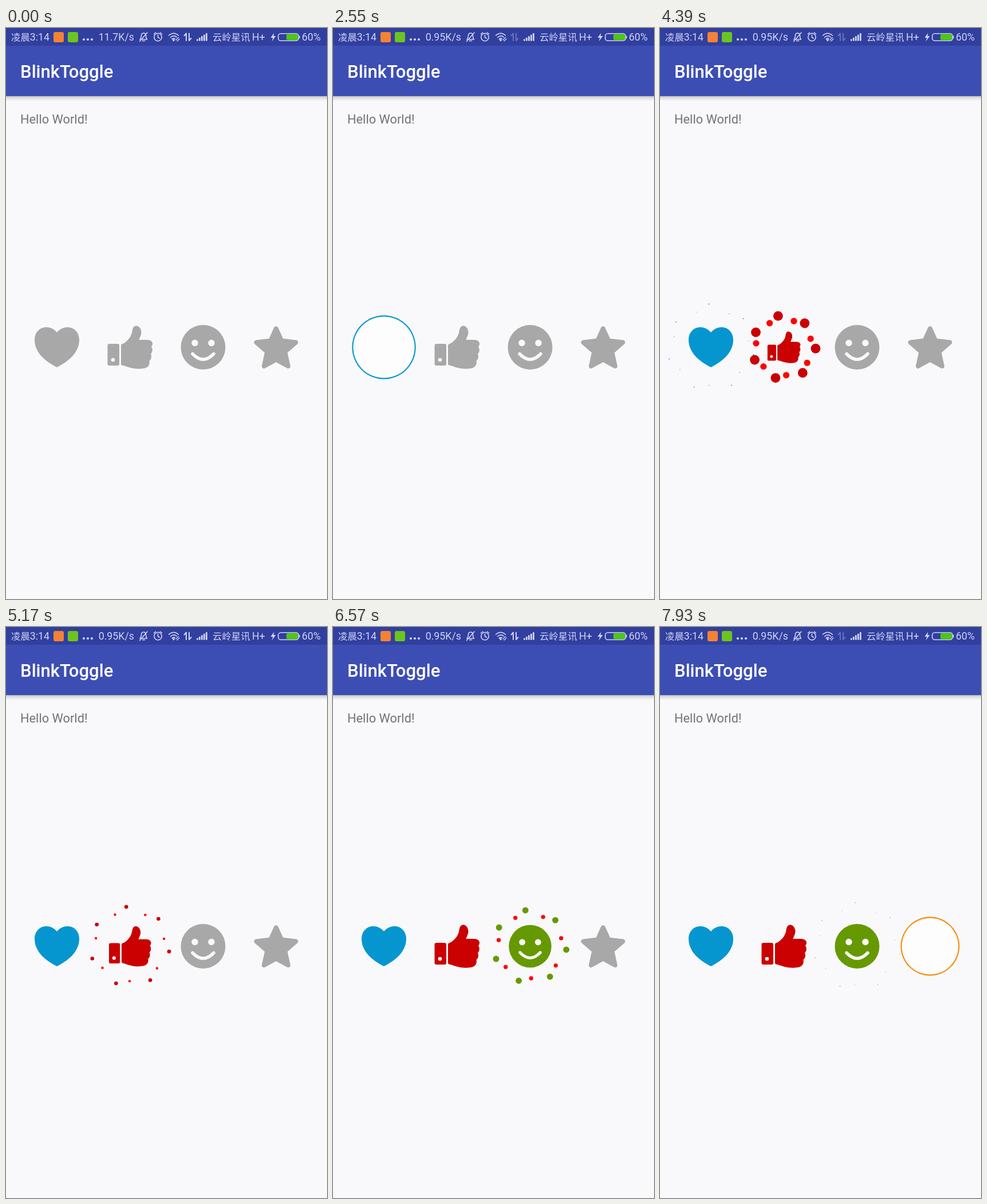
Recreate the animation shown at these times as an HTML page. Size 561 by 998 pixels, loop 8000 ms.

```html
<!DOCTYPE html>
<html lang="en">
<head>
<meta charset="utf-8">
<title>Button sparkle</title>
<style>
  html, body { margin: 0; width: 100%; height: 100%; overflow: hidden; background: #f9f9fb; }
  svg { display: block; width: 100%; height: 100%; }
  text { font-family: Roboto, "Noto Sans CJK SC", "Noto Sans CJK", sans-serif; }
  .status { font-size: 17.8px; fill: #d0d4f2; }
  .cjk { font-size: 16.4px; }
  .line { fill: none; stroke: #d0d4f2; stroke-width: 1.6; stroke-linecap: round; stroke-linejoin: round; }
  .solid { fill: #d0d4f2; }
</style>
</head>
<body>
<svg id="stage" viewBox="0 0 561 998">
  <defs>
    <linearGradient id="shade" x2="0" y2="1">
      <stop offset="0" stop-color="#000" stop-opacity=".3"/>
      <stop offset=".4" stop-color="#000" stop-opacity=".11"/>
      <stop offset="1" stop-color="#000" stop-opacity="0"/>
    </linearGradient>
  </defs>
  <rect width="561" height="998" fill="#f9f9fb"/>
  <rect y="118" width="561" height="10" fill="url(#shade)"/>
  <rect width="561" height="119" fill="#3c4eb4"/>
  <rect width="561" height="31" fill="#313f9f"/>

  <text class="status" x="9" y="22"><tspan class="cjk">凌晨</tspan>3:14</text>
  <rect x="83" y="7" width="18" height="18" rx="3" fill="#f58232"/>
  <rect x="108" y="7" width="18" height="18" rx="3" fill="#6cc51e"/>
  <g class="solid">
    <circle cx="136" cy="20" r="2.1"/><circle cx="143" cy="20" r="2.1"/><circle cx="150" cy="20" r="2.1"/>
  </g>
  <text id="speed" class="status" x="224" y="22" text-anchor="end"></text>

  <g class="line">
    <path d="M234 20H246.500C244.500 18 244.500 16 244.500 13.500C244.500 7.500 236.500 7.500 236.500 13.500C236.500 16 236 18 234 20M238.500 22.500H242.500M247 8L233.500 23.500"/>
    <circle cx="265.500" cy="16" r="6.700"/>
    <path d="M265.500 12V16.500L268.500 18M258.500 10.500L261.500 8M272.500 10.500L269.500 8"/>
    <path d="M284.500 13Q293 5.500 301.500 13M287.500 16.500Q293 11.500 298.500 16"/>
    <path d="M290.500 19.500Q293 17.500 295 19" stroke-width="2"/>
    <path d="M297 21L301.500 16.500M299 23L303 19" stroke-width="1.300"/>
  </g>
  <circle class="solid" cx="293" cy="21.500" r="1.700"/>
  <path id="arrows" class="line" style="stroke-width:2" d="M315 22V9.500L311.500 13.500M320 9.500V22L323.500 18"/>
  <g id="signal" class="solid"></g>
  <text class="status cjk" style="font-size:16.400px" x="361" y="22">云岭星讯</text>
  <text class="status" x="430" y="22">H+</text>
  <path class="solid" d="M468.500 8.500L462.500 17H466.500L464.500 23.500L471.500 14H467.500Z"/>
  <rect class="line" x="475.800" y="9.800" width="35.500" height="12.400" rx="4.500"/>
  <rect x="490" y="11" width="20.500" height="10" rx="2.500" fill="#4cc80e"/>
  <rect class="solid" x="512" y="13.500" width="1.500" height="5" rx=".7"/>
  <text class="status" x="517" y="22">60%</text>

  <text x="25" y="87" font-size="31.100" font-weight="500" fill="#fff">BlinkToggle</text>
  <text x="25" y="167" font-size="21.800" fill="#737376">Hello World!</text>
  <g id="icons"></g>
  <g id="sparks"></g>
</svg>
<script>
const LOOP = 8000;
const RATE = 0.385;
const SIZE = 78, CENTER_Y = 558;
const CLICK = 200, SHINE = 1500, POP = 500, POP_DELAY = 161;
const SPREAD = 1.5, COUNT = 7, TURN = 20;
const GREY = '#a8a8a8', PAPER = '#f9f9fb';

const shapes = {
  heart: '<path d="M0-26C-5-32-12-35-18.500-35C-30-35-39-26-39-13C-39 7-24 23 0 35C24 23 39 7 39-13C39-26 30-35 18.500-35C12-35 5-32 0-26Z"/>',
  thumb: `<rect x="-39" y="-6" width="20.500" height="38" rx="3"/>
    <circle cx="-29.500" cy="22" r="3.300" fill="${PAPER}"/>
    <path d="M-15.500-3C-15.500-6-12-6-9.500-7.500C-2-13 3-20 4-28C5-34 7-37.500 11-37.500C16-37.500 20-32 20-26C20-21 17-17 16-13H30C39-13 42-6 37.500-1C40.500 3 39.500 9 36.500 11.500C38.500 16 37.500 21 34 23.500C35.500 30 32 36 24 37L16 37.700C6 37.700-3 35-9 32.500L-13.500 31.500Q-15.500 31-15.500 29Z"/>`,
  smile: `<circle r="39"/>
    <g fill="${PAPER}"><circle cx="-14.500" cy="-7.500" r="5.700"/><circle cx="14.500" cy="-7.500" r="5.700"/></g>
    <path d="M-18.500 11.500Q0 31 18.500 11.500" fill="none" stroke="${PAPER}" stroke-width="5.500" stroke-linecap="round"/>`,
  star: '<path d="M0-32.500L9.500-11.500L34.500-8.500L15.500 8L21 33L0 21.500L-21 33L-15.500 8L-34.500-8.500L-9.500-11.500Z" stroke="currentColor" stroke-width="8" stroke-linejoin="round"/>'
};

const buttons = [
  { shape: 'heart', x: 89, color: '#0596d0', click: 2125 },
  { shape: 'thumb', x: 216.5, color: '#cb0000', click: 3732 },
  { shape: 'smile', x: 344.5, color: '#669900', click: 5525 },
  { shape: 'star', x: 472, color: '#f88a0c', click: 7686 }
];

const byId = id => document.getElementById(id);

function add(parent, tag, attrs = {}) {
  const el = document.createElementNS('http://www.w3.org/2000/svg', tag);
  set(el, attrs);
  parent.append(el);
  return el;
}

function set(el, attrs) {
  for (const key in attrs) el.setAttribute(key, attrs[key]);
}

const clamp = v => Math.min(1, Math.max(0, v));
const quartOut = p => 1 - (1 - p) ** 4;

// Piecewise linear through evenly spaced keys
function through(keys, p) {
  const pos = clamp(p) * (keys.length - 1);
  const i = Math.min(keys.length - 2, Math.floor(pos));
  return keys[i] + (keys[i + 1] - keys[i]) * (pos - i);
}

for (let i = 0; i < 5; i++) {
  const h = 3 + i * 2.6;
  add(byId('signal'), 'rect', { x: 333 + i * 4, y: 22.5 - h, width: 2.8, height: h });
}

for (const b of buttons) {
  b.icon = add(byId('icons'), 'g');
  b.icon.innerHTML = shapes[b.shape];
  b.layer = add(byId('sparks'), 'g', { transform: `translate(${b.x} ${CENTER_Y})` });
  b.ring = add(b.layer, 'circle', { fill: b.color });
  b.hole = add(b.layer, 'circle', { fill: '#fdfdfd' });
  const dots = fill => Array.from({ length: COUNT }, () => add(b.layer, 'circle', { fill }));
  b.big = dots(b.color);
  b.small = dots('#ff0000');
}

function placeDots(dots, radius, size, angle) {
  dots.forEach((dot, i) => {
    const a = (angle + 360 / COUNT * i) * Math.PI / 180;
    set(dot, { cx: radius * Math.cos(a), cy: radius * Math.sin(a), r: size / 2 });
  });
}

function drawButton(b, time) {
  const age = (time - b.click) * RATE;
  const popAge = age - POP_DELAY;
  const scale = popAge < 0 ? 1 : through([0.4, 1, 0.9, 1], popAge / POP);
  const color = popAge < 0 ? GREY : b.color;
  set(b.icon, { transform: `translate(${b.x} ${CENTER_Y}) scale(${scale})`, fill: color, color });

  const burst = age >= 0 && age < CLICK ? 1.1 * quartOut(age / CLICK) : 0;
  const r = SIZE * burst * 1.3 / 2;
  set(b.ring, { r });
  set(b.hole, { r: Math.max(0, r - 2.1) });

  const p = (age - CLICK) / SHINE;
  const on = p >= 0 && p < 1;
  const v = on ? 1 + (SPREAD - 1) * quartOut(p) : SPREAD;
  const angle = 1 + (v - 1) * TURN;
  placeDots(b.big, SIZE / 1.5 * v, SIZE / 2 * (SPREAD - v), angle);
  placeDots(b.small, SIZE / 1.7 * v, SIZE / 3 * (SPREAD - v), angle - 20);
}

function draw(time) {
  byId('speed').textContent = time < 750 ? '11.7K/s' : '0.95K/s';
  const dim = (time >= 2400 && time < 5000) || time >= 7600;
  set(byId('arrows'), { opacity: dim ? 0.35 : 1 });
  buttons.forEach(b => drawButton(b, time));
}

const start = performance.now();
function tick() {
  draw((performance.now() - start) % LOOP);
  requestAnimationFrame(tick);
}
tick();
</script>
</body>
</html>
```
